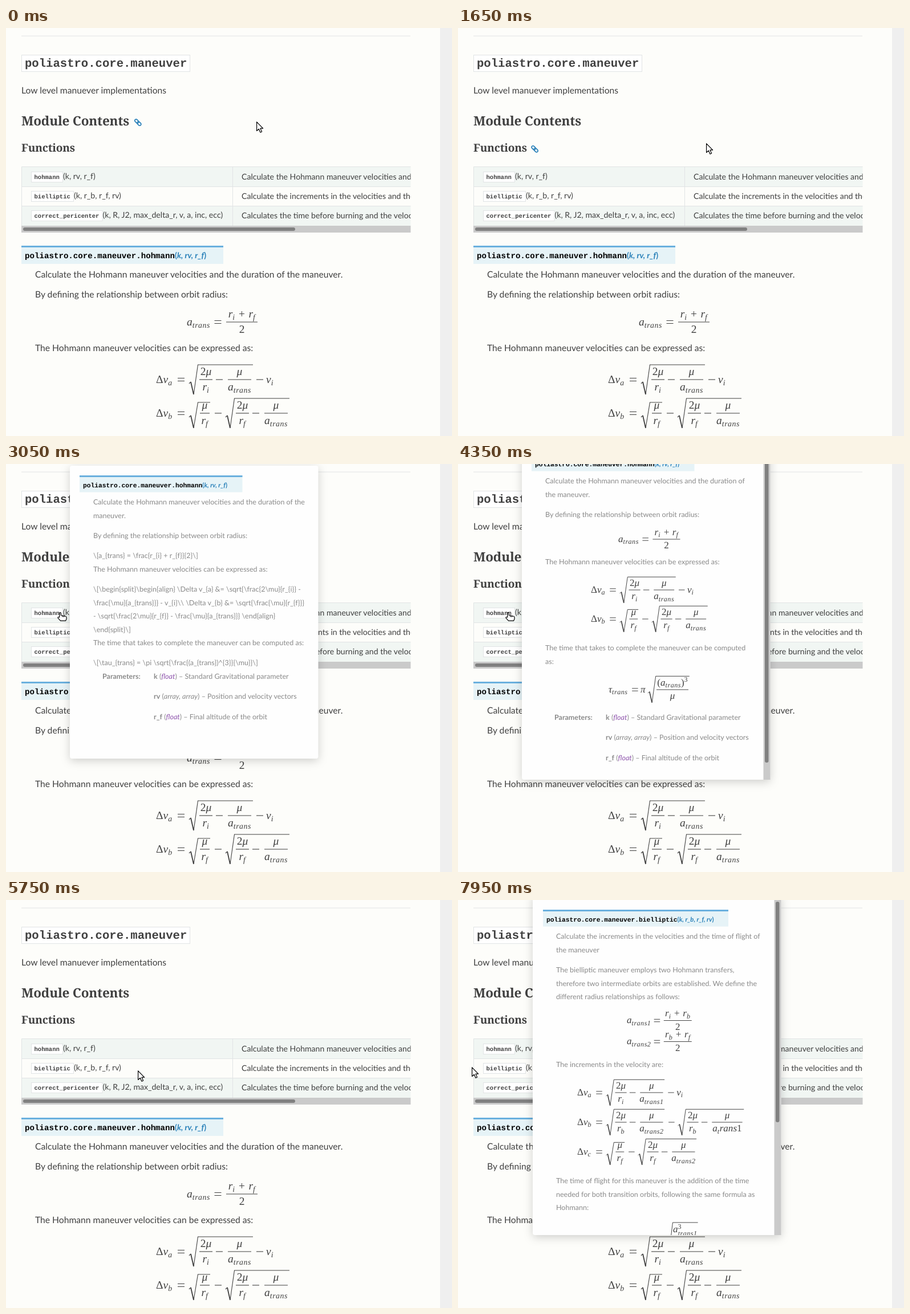
These frames come from a looping animation (782x716 px, 8 s). An HTML page:

```html
<!DOCTYPE html>
<html lang="en">
<head>
<meta charset="utf-8">
<title>Function tooltips</title>
<style>
html, body { margin: 0; width: 100%; height: 100%; overflow: hidden; background: #fdfdfa; }
svg { display: block; }
text { font: 15.67px Lato, sans-serif; fill: #404040; white-space: pre; text-rendering: geometricPrecision; }
.h { font: bold 22.5px "Noto Serif", serif; letter-spacing: -.01em; }
.mono { font-family: "Liberation Mono", monospace; font-weight: bold; }
.cell { font-size: 14.1px; }
.tip { font-size: 12.53px; fill: #8a8a8a; }
.sig { font-weight: bold; fill: #2980b9; }
.sig .mono { fill: #000; }
.b { font-weight: bold; }
.i { font-style: italic; }
.m { font: 19.5px "Liberation Serif", serif; word-spacing: 1.5px; }
.sub { font-size: .71em; font-style: italic; letter-spacing: .04em; baseline-shift: -3.5px; }
.sup { font-size: .71em; baseline-shift: 7px; }
.line { fill: none; stroke: #404040; stroke-width: 1.1; }
.link { fill: none; stroke: #2980b9; stroke-width: 1.7; }
.box { fill: #fff; stroke: #e1e4e5; }
.popup { filter: drop-shadow(0 4px 8px rgba(0, 0, 0, .18)); }
</style>
</head>
<body>
<svg id="stage" width="782" height="716" viewBox="0 0 782 716"></svg>
<script>
const rect = (x, y, w, h, fill, rx = 0) =>
  `<rect x="${x}" y="${y}" width="${w}" height="${h}" fill="${fill}" rx="${rx}"/>`;
const box = (x, y, w, h) => `<rect class="box" x="${x}" y="${y}" width="${w}" height="${h}"/>`;
const text = (x, y, s, cls = '', size) =>
  `<text x="${x}" y="${y}" class="${cls}"${size ? ` style="font-size:${size}px"` : ''}>${s}</text>`;
const line = d => `<path class="line" d="${d}"/>`;

// Mathematics, drawn around the axis y = 0
const math = (x, y, tex, anchor = 'start') => {
  const body = tex.replace(/_(\w+)|\^(\d)|([a-zμπτ]+)|\|/g, (_, sub, sup, it) =>
    sub ? `<tspan class="sub">${sub}</tspan>` :
    sup ? `<tspan class="sup">${sup}</tspan>` :
    it ? `<tspan class="i">${it}</tspan>` : '');
  return `<text class="m" x="${x}" y="${y}" text-anchor="${anchor}">${body}</text>`;
};
const sym = (x, tex) => math(x, 5.5, tex);
const minus = x => line(`M${x} 0h12`);
const equals = x => line(`M${x} -2.5h12m-12 5h12`);
const frac = (x, w, num, den) => line(`M${x} 0h${w}`) +
  math(x + w / 2, -8.5, num, 'middle') + math(x + w / 2, 18.5, den, 'middle');
const root = (x, top, end, bottom = 26) =>
  line(`M${x + 1} 7l3 -3`) + line(`M${x + 9} ${bottom}L${x + 16.5} ${top}H${end}`) +
  `<path class="line" style="stroke-width:1.8" d="M${x + 4} 4L${x + 9} ${bottom}"/>`;
const energy = (x, r, a, w = 41) => root(x, -26, x + 72 + w) +
  frac(x + 19, 23, '2μ', r) + minus(x + 48) + frac(x + 69, w, 'μ', a);
const circular = root(57, -19, 95) + frac(77, 17, 'μ', 'r_f') + minus(103);
const delta = s => sym(0, 'Δv_' + s) + equals(38);
const eq = (x, y, scale, body) =>
  `<g transform="translate(${x} ${y}) scale(${scale})">${body}</g>`;

const axisEq = sym(0, 'a_trans') + equals(48.5) + frac(69, 55, 'r_i + r_f', '2');
const axisEq2 = (n, num) => sym(0, 'a_trans' + n) + equals(54.5) + frac(74, 56, num, '2');
const deltaA = delta('a') + energy(57, 'r_i', 'a_trans') + minus(176) + sym(193, 'v_i');
const deltaB = delta('b') + circular + energy(121, 'r_f', 'a_trans');
const period = sym(0, 'τ_trans') + equals(47) + sym(64, 'π') +
  root(78, -27, 162) + frac(96, 64, '(a_trans)^3', 'μ');

const signature = (x, y, w, h, base, size, name, args) =>
  rect(x, y, w, h, '#e6f3f7') + rect(x, y, w, 3, '#6ab0de') +
  text(x + 6, base, `<tspan class="mono" style="font-size:${size}px">poliastro.core.maneuver.${name}</tspan>` +
    `(<tspan class="i">${args}</tspan>)`, 'sig', size);

// Page
const row = (y, name, w, args, summary) =>
  box(44.5, y - 12.5, w, 18) + text(49.5, y, name, 'mono', 10.55) +
  text(45 + w, y - .5, args, 'cell') + text(413, y + 1, summary, 'cell');
const page = rect(0, 0, 782, 716, '#fdfdfa') + rect(761, 0, 21, 716, '#efefef') +
  rect(27, 13.5, 682, 1, '#e1e4e5') +
  box(27.5, 47.5, 295, 29) + text(33, 68, 'poliastro.core.maneuver', 'mono', 20.6) +
  text(27, 115, 'Low level manuever implementations') +
  text(27, 171, 'Module Contents', 'h') + text(27, 217, 'Functions', 'h', 19.1) +
  '<svg width="709.5" height="716">' +
  rect(27, 243, 683, 35, '#f1f6f3') + rect(27, 312, 683, 35, '#f1f6f3') +
  '<path d="M710 243.5H27.5V347M27 278.5H710M27 312.5H710M397.5 243V347" fill="none" stroke="#e1e4e5"/>' +
  row(265, 'hohmann', 55, '(k, rv, r_f)', 'Calculate the Hohmann maneuver velocities and the duration') +
  row(299, 'bielliptic', 74, '(k, r_b, r_f, rv)', 'Calculate the increments in the velocities and the time') +
  row(333, 'correct_pericenter', 124.5, '(k, R, J2, max_delta_r, v, a, inc, ecc)',
    'Calculates the time before burning and the velocity') +
  rect(27, 347, 683, 12, '#cacaca') + rect(30, 350, 477, 6, '#808080', 3) + '</svg>' +
  signature(27, 382, 354, 32, 404, 14.15, 'hohmann', 'k, rv, r_f') +
  text(51, 438, 'Calculate the Hohmann maneuver velocities and the duration of the maneuver.') +
  text(51, 473, 'By defining the relationship between orbit radius:') +
  eq(317, 516, 1, axisEq) +
  text(51, 567, 'The Hohmann maneuver velocities can be expressed as:') +
  eq(263, 617, 1, deltaA) + eq(263, 676, 1, deltaB);

const link = (x, y) => `<g class="link" transform="translate(${x} ${y}) rotate(45)">
  <rect x="-6.8" y="-2.4" width="7.8" height="4.8" rx="2.3"/>
  <rect x="-1" y="-2.4" width="7.8" height="4.8" rx="2.3"/></g>`;

// Tooltips: paragraphs are [centre y, text] pairs
const tipLines = (x, list) => list.map(([y, s]) =>
  text(x, y + 4, s.replace(/&/g, '&amp;'), 'tip')).join('');
const param = (x, y, name, type, color, desc) => text(x, y + 4,
  `<tspan class="b">${name}</tspan> (<tspan class="i" style="fill:${color}">${type}</tspan>) – ${desc}`, 'tip');
const params = (x, y, color) => text(x, y + 4, 'Parameters:', 'tip b') +
  param(x + 90, y, 'k', 'float', color, 'Standard Gravitational parameter') +
  param(x + 90, y + 35.3, 'rv', 'array, array', '#8a8a8a', 'Position and velocity vectors') +
  param(x + 90, y + 70.6, 'r_f', 'float', color, 'Final altitude of the orbit');
const tooltip = (x, top, bottom, thumb, body) =>
  `<g class="popup">${rect(x, top, 435.5, bottom - top, '#fefefe', 4)}</g><svg width="782" height="${bottom}">` + body +
  (thumb ? rect(x + 423.5, 0, 12, bottom, '#cacaca') +
    rect(x + 426, thumb[0], 6.5, thumb[1] - thumb[0], '#808080', 3) : '') + '</svg>';

const raw = String.raw;
const hohmannHead = signature(129, 20, 285.5, 29.5, 41, 11.25, 'hohmann', 'k, rv, r_f');
const hohmannRaw = tipLines(153, [
  [126, 'By defining the relationship between orbit radius:'],
  [161, raw`\[a_{trans} = \frac{r_{i} + r_{f}}{2}\]`],
  [185, 'The Hohmann maneuver velocities can be expressed as:'],
  [220, raw`\[\begin{split}\begin{align} \Delta v_{a} &= \sqrt{\frac{2\mu}{r_{i}} -`],
  [243.5, raw`\frac{\mu}{a_{trans}}} - v_{i}\\ \Delta v_{b} &= \sqrt{\frac{\mu}{r_{f}}}`],
  [267, raw`- \sqrt{\frac{2\mu}{r_{f}} - \frac{\mu}{a_{trans}}} \end{align}`],
  [290.5, raw`\end{split}\]`],
  [314, 'The time that takes to complete the maneuver can be computed as:'],
  [349, raw`\[\tau_{trans} = \pi \sqrt{\frac{(a_{trans})^{3}}{\mu}}\]`]
]) + params(169, 373, '#8e54ac');
const hohmannNarrow = tipLines(153, [
  [30, 'Calculate the Hohmann maneuver velocities and the duration of'],
  [54, 'the maneuver.']
]);
const up = body => `<g transform="translate(0 -37)">${body}</g>`;

const hohmannPlain = tooltip(112, 3, 517, null, hohmannHead + tipLines(153, [
  [67, 'Calculate the Hohmann maneuver velocities and the duration of the'],
  [91, 'maneuver.']
]) + hohmannRaw);
const hohmannMoved = tooltip(112, -34, 554, [-30, 530], up(hohmannHead + hohmannRaw) + hohmannNarrow);
const hohmannSet = tooltip(112, -34, 554, [-30, 524], up(hohmannHead) + hohmannNarrow + tipLines(153, [
  [89, 'By defining the relationship between orbit radius:'],
  [172, 'The Hohmann maneuver velocities can be expressed as:'],
  [323, 'The time that takes to complete the maneuver can be computed'],
  [347, 'as:']
]) + eq(281, 132, .875, axisEq) + eq(233, 221, .875, deltaA) + eq(233, 272, .875, deltaB) +
  eq(264, 396, .875, period) + params(169, 445, '#8e54ac'));

const biellipticHead = signature(149, 17, 325, 29.5, 38, 11.25, 'bielliptic', 'k, r_b, r_f, rv') + tipLines(172, [
  [64, 'Calculate the increments in the velocities and the time of flight of'],
  [88, 'the maneuver'],
  [123, 'The bielliptic maneuver employs two Hohmann transfers,'],
  [147, 'therefore two intermediate orbits are established. We define the'],
  [170, 'different radius relationships as follows:']
]);
const flight = y => [
  [y, 'The time of flight for this maneuver is the addition of the time'],
  [y + 23.5, 'needed for both transition orbits, following the same formula as'],
  [y + 47, 'Hohmann:']
];
const biellipticPlain = tooltip(131, -10, 588, [3, 450], biellipticHead + tipLines(172, [
  [205, raw`\[\begin{split}\begin{align} a_{trans1} &= \frac{r_{i} + r_{b}}{2}\\`],
  [229, raw`a_{trans2} &= \frac{r_{b} + r_{f}}{2}\\ \end{align}\end{split}\]`],
  [252, 'The increments in the velocity are:'],
  [287.5, raw`\[\begin{split}\begin{align} \Delta v_{a} &= \sqrt{\frac{2\mu}{r_{i}} -`],
  [311, raw`\frac{\mu}{a_{trans1}}} - v_{i}\\ \Delta v_{b} &= \sqrt{\frac{2`],
  [335, raw`\mu}{r_{b}} - \frac{\mu}{a_{trans2}}} - \sqrt{\frac{2\mu}{r_{b}} -`],
  [358, raw`\frac{\mu}{a_trans{1}}}\\ \Delta v_{c} &= \sqrt{\frac{\mu}{r_{f}}} -`],
  [382, raw`\sqrt{\frac{2\mu}{r_{f}} - \frac{\mu}{a_{trans2}}}\\ \end{align}`],
  [405, raw`\end{split}\]`],
  ...flight(429),
  [511, raw`\[\begin{split}\begin{align} \tau_{trans1} &= \pi`],
  [535, raw`\sqrt{\frac{a_{trans1}^{3}}{\mu}}\\ \tau_{trans2} &= \pi`],
  [558, raw`\sqrt{\frac{a_{trans2}^{3}}{\mu}}\\ \end{align}\end{split}\]`]
]) + params(188, 582, '#2980b9'));
const biellipticSet = tooltip(131, -10, 588, [3, 390], biellipticHead +
  tipLines(172, [[289, 'The increments in the velocity are:'], ...flight(493)]) +
  eq(296, 211.5, .875, axisEq2(1, 'r_i + r_b')) + eq(296, 248.5, .875, axisEq2(2, 'r_b + r_f')) +
  eq(209, 338, .875, delta('a') + energy(57, 'r_i', 'a_trans1', 46) + minus(182) + sym(199, 'v_i')) +
  eq(209, 390, .875, delta('b') + energy(57, 'r_b', 'a_trans2', 46) + minus(183) + energy(201, 'r_b', 'a_t|rans1', 61)) +
  eq(209, 442, .875, delta('c') + circular + energy(121, 'r_f', 'a_trans2', 46)) +
  eq(362, 594, .875, root(0, -32, 67, 30) + math(17, -12.5, 'a^3') + math(27, -10, '_trans1')));

const popups = [
  [3050, 3150, hohmannPlain], [3150, 3350, hohmannMoved], [3350, 5000, hohmannSet],
  [6850, 7200, biellipticPlain], [7200, 8000, biellipticSet]
];

// Pointer path: time, x, y of the hot spot
const path = [
  [0, 439, 164], [350, 439, 164], [550, 462, 156], [900, 452, 200], [1200, 445, 168],
  [1400, 446, 202], [1600, 446, 202], [1650, 435, 202], [2450, 156, 256], [2500, 156, 256],
  [2750, 95, 260], [4300, 95, 260], [4350, 88, 260], [4750, 21, 266], [4900, 21, 266],
  [5150, 10, 268], [5750, 231, 299], [6150, 231, 299], [6400, 165, 286], [6600, 106, 295],
  [7800, 106, 295], [7950, 24, 293], [8000, 24, 293]
];
const pointerAt = t => {
  const i = path.findIndex(k => k[0] > t);
  const [t0, x0, y0] = path[i - 1], [t1, x1, y1] = path[i];
  const p = (t - t0) / (t1 - t0);
  return [x0 + (x1 - x0) * p, y0 + (y1 - y0) * p];
};
const inside = (x, y, x0, y0, x1, y1) => x >= x0 && x <= x1 && y >= y0 && y <= y1;

const stage = document.getElementById('stage');
stage.innerHTML = page +
  `<g id="moduleLink">${link(231.3, 165.7)}</g><g id="functionsLink">${link(134.6, 212.3)}</g>` +
  popups.map(p => `<g class="state">${p[2]}</g>`).join('') +
  `<g id="pointer" stroke="#000" stroke-width="1.2" stroke-linejoin="round" fill="#fff">
    <path id="arrow" d="M.6 .8V16.5L4.3 13.2L7 19.2L9.6 18L7 12.2H11.6Z"/>
    <path id="hand" d="M-1.2 9V1.5Q0 -.4 1.4 1.5V5.5L9 7Q11 7.4 11 9.5V12L9.5 15.2H.5L-4 10.2Q-4.4 7.6 -1.2 9ZM3.8 6.2V8.4M6.4 6.8V8.8"/>
  </g>`;
const states = [...stage.querySelectorAll('.state')];
const [moduleLink, functionsLink, pointer, arrow, hand] =
  ['moduleLink', 'functionsLink', 'pointer', 'arrow', 'hand'].map(id => document.getElementById(id));
const show = (el, on) => { el.style.display = on ? '' : 'none'; };

function draw(now) {
  const t = Math.floor(now % 8000 / 50) * 50;
  const [x, y] = pointerAt(t);
  const onCode = inside(x, y, 44, 252, 100, 271) || inside(x, y, 44, 286, 119, 305);
  pointer.setAttribute('transform', `translate(${x} ${y})`);
  show(hand, onCode);
  show(arrow, !onCode);
  show(moduleLink, inside(x, y, 27, 146, 709, 185));
  show(functionsLink, inside(x, y, 27, 194, 709, 226));
  popups.forEach(([from, to], i) => show(states[i], t >= from && t < to));
}

const start = performance.now();
(function tick() {
  draw(performance.now() - start);
  requestAnimationFrame(tick);
})();
</script>
</body>
</html>
```
